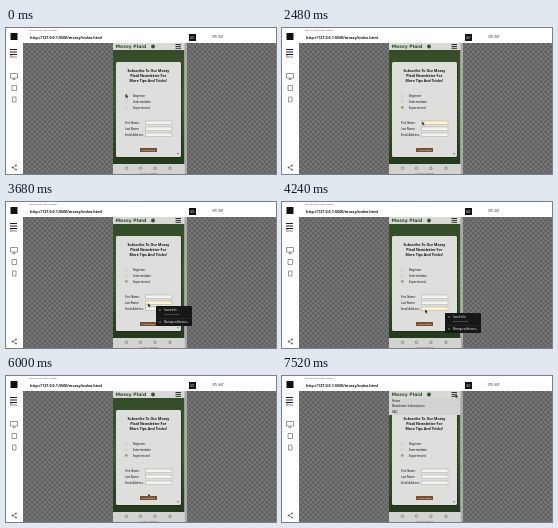
An HTML page that plays this animation: 270 by 146 pixels, repeating every 8 s.

```html
<!DOCTYPE html>
<html lang="en">
<head>
<meta charset="utf-8">
<title>Newsletter form preview</title>
<style>
html, body { margin: 0; width: 100%; height: 100%; overflow: hidden; background: #fff; }
svg { display: block; width: 100vw; height: 100vh; }
text { font-family: "Noto Sans", sans-serif; font-size: 2.9px; fill: #111; }
.bold { font-family: "DejaVu Sans", sans-serif; font-weight: bold; }
.title { font-size: 3.55px; text-anchor: middle; }
.line { fill: none; stroke: #555; stroke-width: .6; }
</style>
</head>
<body>
<svg viewBox="0 0 270 146" preserveAspectRatio="none">
  <defs>
    <pattern id="check" width="5" height="5" patternUnits="userSpaceOnUse">
      <path fill="#777" d="M0 0h5v5h-5z"/>
      <path fill="#606060" d="M0 0h2.5v2.5h-2.5zM2.5 2.5h2.5v2.5h-2.5z"/>
    </pattern>
    <linearGradient id="grass" x2="0" y2="1">
      <stop stop-color="#344d28"/><stop offset=".5" stop-color="#3d5731"/><stop offset="1" stop-color="#243a1c"/>
    </linearGradient>
  </defs>

  <!-- Viewer frame -->
  <path fill="#fff" d="M0 0h270v146H0z"/>
  <path fill="url(#check)" d="M17 15h253v131H17z"/>
  <text x="23" y="3" font-size="2.6" style="font-size:2.5px;fill:#555">Responsive page viewer</text>
  <text x="24" y="10.5" style="font-size:3.7px;font-weight:600">http://127.0.0.1:5500/mossy/index.html</text>
  <path fill="#111" d="M183 6h7v7h-7z"/>
  <text x="184.2" y="10.5" style="fill:#fff;font-size:2.7px">GO</text>
  <text x="206" y="10.4">375</text><text x="212.5" y="10.4">667</text>
  <path fill="#111" d="M4.5 5h7v7h-7z"/>
  <path stroke="#24152d" stroke-width="1" d="M4 21.5h7M4 24h7M4 26.5h7"/>
  <text x="4" y="30.3" style="font-size:2.6px;fill:#59316b">Menu</text>
  <g class="line">
    <path d="M4.5 45.5h7v4.5h-7zM6.5 51.5h3M8 50v1.5M6 57.5h4.5v5H6zM6.5 69h3.5v5H6.5z"/>
    <path d="M10 137.5L6.5 139.5L10 141.5"/>
    <g fill="#444"><circle cx="10" cy="137.4" r=".6"/><circle cx="6.5" cy="139.5" r=".6"/><circle cx="10" cy="141.6" r=".6"/></g>
  </g>

  <!-- Page -->
  <path fill="#d9dad8" d="M107 15h74v131h-74z"/>
  <path fill="url(#grass)" d="M107 22h71.5v114h-71.5z"/>
  <path fill="#aaa" d="M178.5 15h2.5v131h-2.5z"/>
  <text class="bold" x="109.5" y="20.2" style="font-size:4.6px;fill:#304b2a">Mossy Plaid</text>
  <circle cx="147" cy="18.5" r="2" fill="#365332"/>
  <path stroke="#17221a" stroke-width=".9" d="M169.5 16.5h5.5M169.5 18.4h5.5M169.5 20.3h5.5"/>
  <rect x="110" y="34.7" width="66" height="95.5" rx="2" fill="#1c2c17" opacity=".65"/>
  <rect x="110" y="34" width="65" height="95" rx="1.5" fill="#dedfdd"/>
  <g class="bold">
    <text class="title" x="142.3" y="43.6">Subscribe To Our Mossy</text>
    <text class="title" x="142.3" y="48.6">Plaid Newsletter For</text>
    <text class="title" x="142.3" y="53.6">More Tips And Tricks!</text>
  </g>
  <g id="radios"></g>
  <g id="fields"></g>
  <path fill="#78502f" d="M134 120h17v4h-17z"/>
  <text x="142.5" y="123" text-anchor="middle" style="font-size:2.5px;fill:#f5e6ca">SUBSCRIBE</text>
  <path class="line" d="M170.8 125l1.3 1.3l1-1.3"/>
  <path fill="#d3d4d2" d="M107 136h71.5v10h-71.5z"/>
  <g class="line" style="stroke:#77614d">
    <circle cx="120.5" cy="140.3" r="1.3"/><circle cx="134.5" cy="140.3" r="1.3"/>
    <circle cx="149" cy="140.3" r="1.3"/><circle cx="164" cy="140.3" r="1.3"/>
  </g>
  <text x="142.5" y="146" text-anchor="middle" style="font-size:2.2px;fill:#80593b">All rights reserved</text>

  <g id="menu">
    <path fill="#d3d4d2" d="M107 22h71.5v17h-71.5z"/>
    <text x="110" y="25.6">Home</text>
    <text x="110" y="31.4">Newsletter Subscription</text>
    <text x="110" y="37.2">FAQ</text>
  </g>
  <g id="popup">
    <rect width="36" height="20" rx=".8" fill="#171717"/>
    <g style="font-size:2.5px">
      <circle cx="4" cy="4" r=".7" fill="#bbb"/>
      <text x="8" y="5" style="font-size:2.6px;fill:#eee">Saved info</text>
      <text x="8" y="9" style="font-size:2.4px;fill:#bbb">From this site</text>
      <path stroke="#444" stroke-width=".3" d="M0 12.5h36"/>
      <circle cx="4" cy="16" r=".7" fill="#bbb"/>
      <text x="8" y="17" style="font-size:2.6px;fill:#eee">Manage addresses…</text>
    </g>
  </g>
  <path id="cursor" d="M0 0v4l1-.8l.7 1.5l.7-.3l-.7-1.4h1.3z" fill="#111" stroke="#fff" stroke-width=".25"/>
</svg>
<script>
const $ = id => document.getElementById(id);
const LOOP = 8000, STEP = 80;

$("radios").innerHTML = ["Beginner", "Intermediate", "Experienced"].map((label, i) => {
  const y = 67.5 + i * 6;
  return `<circle cx="120.3" cy="${y}" r="1.3" fill="#f4f4f2" stroke="#999" stroke-width=".4"/>
    <circle class="dot" cx="120.3" cy="${y}" r="1.15" fill="#b38b25"/>
    <text x="127" y="${y + 1}">${label}</text>`;
}).join("");

$("fields").innerHTML = ["First Name:", "Last Name:", "Email Address:"].map((label, i) => {
  const y = 93 + i * 6;
  return `<text x="119" y="${y + 3}" style="font-size:2.7px">${label}</text>
    <rect class="input" x="139.5" y="${y}" width="26.5" height="3.7" stroke="#8b8b84" stroke-width=".35"/>`;
}).join("");

const dots = document.querySelectorAll(".dot");
const inputs = document.querySelectorAll(".input");

// time, x, y
const path = [
  [0, 119.5, 66], [880, 120, 67], [1360, 120.5, 72], [1760, 120.5, 78],
  [2000, 121, 79], [2400, 140, 93], [2880, 140.5, 95], [3200, 141, 100],
  [3760, 142, 101], [4080, 143, 107], [4480, 143, 108], [4880, 140, 116],
  [5280, 140.5, 117], [5760, 141, 121], [5920, 141, 121], [6640, 173, 17],
  [7200, 173, 17], [7520, 173.3, 18], [LOOP, 173.3, 18]
];

function place(t) {
  const i = path.findIndex(p => p[0] > t);
  const [t0, x0, y0] = path[i - 1], [t1, x1, y1] = path[i];
  const k = (t - t0) / (t1 - t0), e = k * k * (3 - 2 * k);
  return [x0 + (x1 - x0) * e, y0 + (y1 - y0) * e];
}

const show = (el, on) => el.setAttribute("visibility", on ? "visible" : "hidden");

function draw(now) {
  const t = Math.floor(now % LOOP / STEP) * STEP;
  const choice = t < 1440 ? 0 : t < 1840 ? 1 : 2;
  const focus = t < 2400 || t >= 4640 ? -1 : t < 3200 ? 0 : t < 4080 ? 1 : 2;
  dots.forEach((dot, i) => show(dot, i === choice));
  inputs.forEach((box, i) => box.setAttribute("fill", i === focus ? "#fff4cf" : "#f3f3f0"));
  show($("popup"), focus > 0);
  $("popup").setAttribute("transform", focus === 2 ? "translate(163 111)" : "translate(150 104)");
  show($("menu"), t >= 7040);
  $("cursor").setAttribute("transform", `translate(${place(t)})`);
  requestAnimationFrame(draw);
}
requestAnimationFrame(draw);
</script>
</body>
</html>
```
